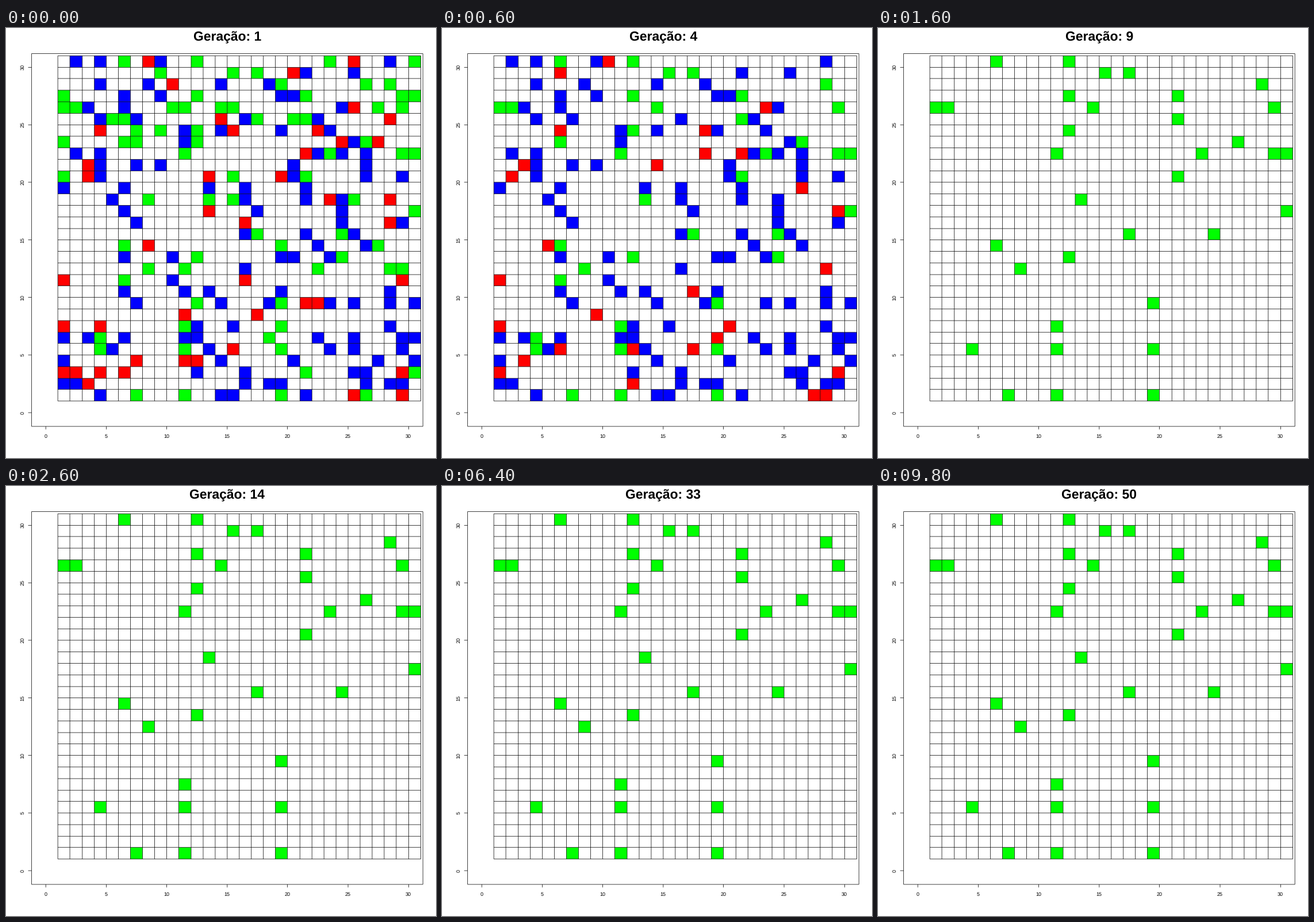
Animation of 748x748 px, one loop 10 s. Source, as a matplotlib script:

```python
import math
import random

import matplotlib.pyplot as plt
from matplotlib.animation import FuncAnimation
from matplotlib.collections import LineCollection, PolyCollection

SIZE, DPI = 748, 64
UNITS = 1000                        # the plot is laid out on a 1000-unit page
PT = 72 / DPI * SIZE / UNITS        # points per unit
SIDE = 30
GENERATIONS = 50
MARGIN = 14.4                       # one line of margin
LEFT, TOP = 4.1 * MARGIN, 4.1 * MARGIN
RIGHT, BOTTOM = UNITS - 2.1 * MARGIN, UNITS - 5.1 * MARGIN
WHITE, RED, GREEN, BLUE = "#ffffff", "#ff0000", "#00ff00", "#0000ff"

# Plants that are never eaten: row -> columns.
LASTING = {
    30: (6, 12), 29: (15, 17), 28: (28,), 27: (12, 21), 26: (1, 2, 14, 29),
    25: (21,), 24: (12,), 23: (26,), 22: (11, 23, 29, 30), 20: (21,),
    18: (13,), 17: (30,), 15: (17, 24), 14: (6,), 13: (12,), 12: (8,),
    9: (19,), 7: (11,), 5: (4, 11, 19), 1: (7, 11, 19)}
PLANTS = [(c, r) for r, cols in LASTING.items() for c in cols]
SETTLED = [(1, r) for r in (3, 7, 11)]   # grazers that never move

# Scatter everything else over the free cells.
rng = random.Random(31)
free = [(c, r) for c in range(1, SIDE + 1) for r in range(1, SIDE + 1)
        if (c, r) not in PLANTS + SETTLED]
rng.shuffle(free)
HUNTERS, GRAZERS, FOOD = free[:118], free[118:159], free[159:201]


def clamp(v):
    return min(max(v, 1), SIDE)


def plants(gen):
    """Lasting plants and the food that is still uneaten."""
    return PLANTS + FOOD[:round(len(FOOD) * 0.45 ** (gen - 1))]


def hunters(gen):
    """Hunters wait, then the fed ones split in two and all others starve."""
    if gen < 6:
        return HUNTERS
    if gen > 6:
        return []
    walk = random.Random(6)
    young = []
    for x, y in HUNTERS[:23]:
        side = walk.choice((-1, 1))
        young += [(x, y), (clamp(x + side), clamp(y + 1))]
    return young


def grazers(gen):
    """Grazers wander two cells at a time and starve from generation 4."""
    alive = 44 - 9 * max(gen - 3, 0)
    if alive <= 0:
        return []
    walk = random.Random(4)
    herd = GRAZERS
    for _ in range(1, gen):
        herd = [(clamp(x + walk.randint(-2, 2)), clamp(y + walk.randint(-2, 2)))
                for x, y in herd]
    return (SETTLED + herd)[:alive]


def px(x):
    return LEFT + (x + 1.2) * (RIGHT - LEFT) / 32.4


def py(y):
    return BOTTOM - (y + 1.2) * (BOTTOM - TOP) / 32.4


def mid(v):
    """Centre of the unit that holds v, so that lines sit on whole units."""
    return math.floor(v) + 0.5


def line(x0, y0, x1, y1):
    return [(mid(x0), mid(y0)), (mid(x1), mid(y1))]


def square(c, r):
    x0, x1, y0, y1 = (mid(v) for v in (px(c), px(c + 1), py(r), py(r + 1)))
    return [(x0, y0), (x1, y0), (x1, y1), (x0, y1)]


def colours(gen):
    grid = [WHITE] * (SIDE * SIDE)
    for colour, layer in ((RED, grazers), (BLUE, hunters), (GREEN, plants)):
        for c, r in layer(gen):
            grid[(r - 1) * SIDE + c - 1] = colour
    return grid


plt.rcParams["font.family"] = "Liberation Sans"
plt.rcParams["text.hinting"] = "none"
fig = plt.figure(figsize=(SIZE / DPI, SIZE / DPI), dpi=DPI, facecolor="white")
ax = fig.add_axes([0, 0, 1, 1])
ax.set_xlim(0, UNITS)
ax.set_ylim(UNITS, 0)
ax.axis("off")

board = PolyCollection(
    [square(c, r) for r in range(1, SIDE + 1) for c in range(1, SIDE + 1)],
    facecolors=WHITE, edgecolors="none", snap=False)
ax.add_collection(board, autolim=False)

lines = [line(LEFT, y, RIGHT, y) for y in (TOP, BOTTOM)]
lines += [line(x, TOP, x, BOTTOM) for x in (LEFT, RIGHT)]
for v in range(1, SIDE + 2):
    lines.append(line(px(v), py(1), px(v), py(SIDE + 1)))
    lines.append(line(px(1), py(v), px(SIDE + 1), py(v)))
label = dict(ha="center", va="baseline", rotation_mode="anchor",
             fontsize=12 * PT, color="black")
for v in range(0, SIDE + 1, 5):
    lines.append(line(px(v), BOTTOM, px(v), BOTTOM + MARGIN / 2))
    lines.append(line(LEFT, py(v), LEFT - MARGIN / 2, py(v)))
    ax.text(px(v), BOTTOM + 1.8 * MARGIN, str(v), **label)
    ax.text(LEFT - 1.2 * MARGIN, py(v), str(v), rotation=90, **label)
ax.add_collection(LineCollection(lines, colors="black", linewidths=PT,
                                 snap=False), autolim=False)
title = ax.text((LEFT + RIGHT) / 2, TOP / 2, "", ha="center", va="baseline",
                fontsize=30.6 * PT, fontweight="bold", color="black")


def draw(i):
    gen = i + 1
    board.set_facecolor(colours(gen))
    title.set_text(f"Geração: {gen}")
    return board, title


anim = FuncAnimation(fig, draw, frames=GENERATIONS, interval=200, repeat=True,
                     repeat_delay=0, blit=False)
plt.show()
```
